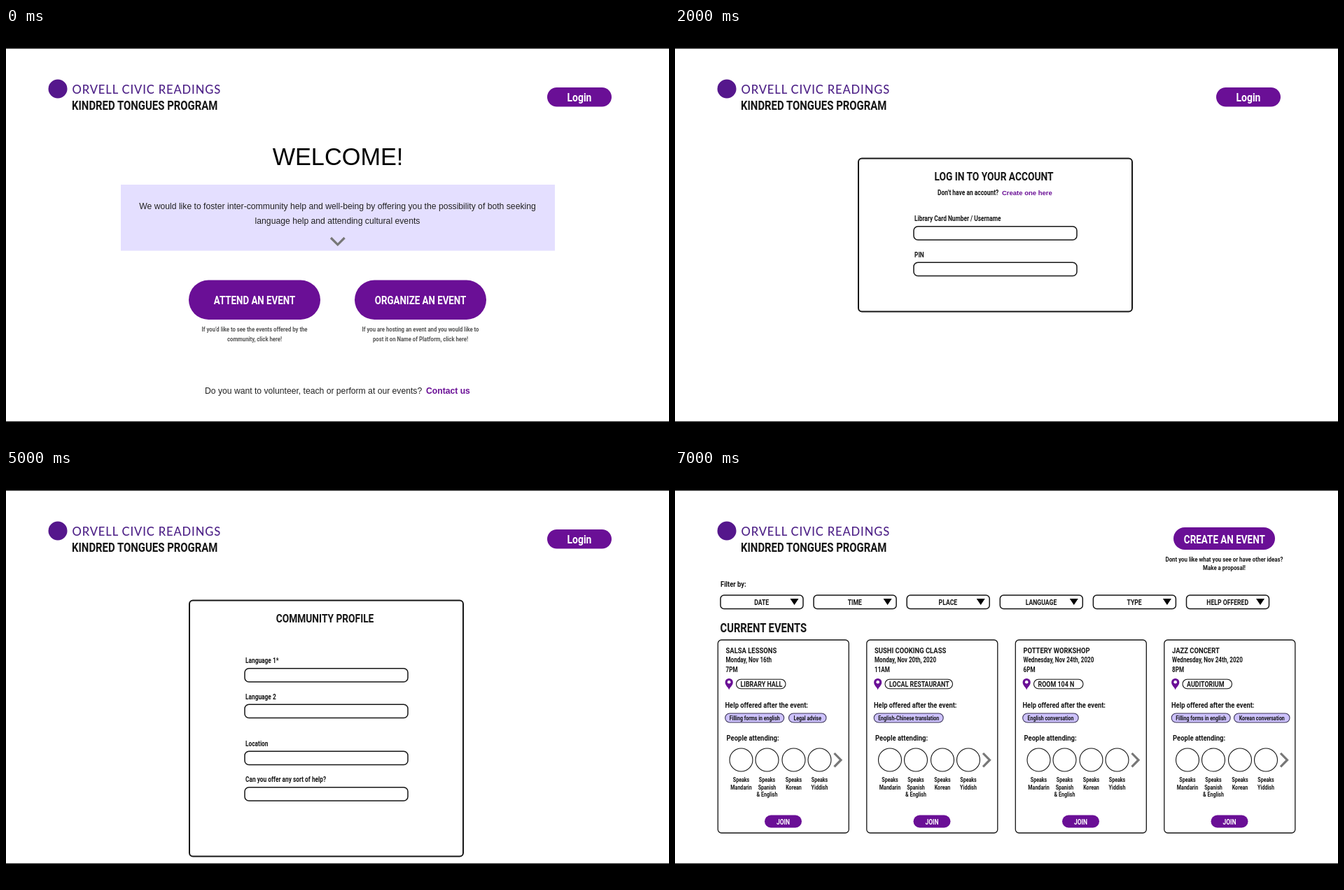
An HTML page that plays this animation: 947x592 px, repeating every 8000 ms.

```html
<!DOCTYPE html>
<html lang="en">
<head>
<meta charset="utf-8">
<title>Community events prototype</title>
<style>
  html, body { margin: 0; width: 100%; height: 100%; overflow: hidden; background: #fff; }
  svg { display: block; }
  text { white-space: pre; }
  .cond { font-family: Roboto, sans-serif; }
  .sans { font-family: "Liberation Sans", sans-serif; }
  .brand { font-family: Lato, sans-serif; font-weight: 500; letter-spacing: .85px; }
</style>
</head>
<body>
<svg id="stage" width="947" height="592" viewBox="0 0 947 592"></svg>
<script>
const INK = '#161616', GRAY = '#777', PURPLE = '#6a0f96', LILAC = '#cdc2fe', PALE = '#e4dfff';
const STEP = 1000;
const NARROW = 0.81, CAP = 0.955; // proportions of the condensed face

const anchors = { l: 'start', c: 'middle' };

function cond(x, y, str, size, fill = INK, align = 'l', weight = 600) {
  return `<text class="cond" transform="translate(${x} ${y}) scale(${NARROW} 1)" font-size="${size * CAP}" ` +
    `fill="${fill}" text-anchor="${anchors[align]}" font-weight="${weight}">${str}</text>`;
}
const mid = (x, y, str, size, fill, weight) => cond(x, y, str, size, fill, 'c', weight);

function sans(x, y, str, size, fill = '#222', align = 'c', weight = 400) {
  return `<text class="sans" x="${x}" y="${y}" font-size="${size}" fill="${fill}" ` +
    `text-anchor="${anchors[align]}" font-weight="${weight}">${str}</text>`;
}

function box(x, y, w, h, r = 6, fill = '#fff', stroke = INK, line = 1.5) {
  return `<rect x="${x}" y="${y}" width="${w}" height="${h}" rx="${r}" fill="${fill}" ` +
    `stroke="${stroke}" stroke-width="${line}"/>`;
}
const panel = (x, y, w, h, line = 2) => box(x, y, w, h, 5, '#fff', INK, line);
const pill = (x, y, w, h) => box(x, y, w, h, h / 2, PURPLE, 'none', 0);
const arrow = (x, y) => `<path d="M${x - 6} ${y}h12l-6 9z" fill="#000"/>`;
const chevron = d => `<path d="${d}" fill="none" stroke="${GRAY}" stroke-width="3.2"/>`;
const lines = (x, y, gap, rows, draw) => rows.map((row, i) => draw(x, y + i * gap, row)).join('');

const masthead = () =>
  `<circle cx="74" cy="87" r="13.5" fill="#55178c"/>` +
  `<text class="brand" x="94.5" y="94" font-size="16.6" fill="#4f2388">ORVELL CIVIC READINGS</text>` +
  cond(94, 117, 'KINDRED TONGUES PROGRAM', 19.3);

const header = () => masthead() + pill(773, 85, 92, 27.5) + mid(819, 105, 'Login', 18, '#fff');

function bigButton(x, y, label) {
  return pill(x, y, 188, 56.5) + mid(x + 94, y + 34.5, label, 17.2, '#fff');
}

function welcome(open) {
  const top = open ? 418.5 : 360.5;
  const caption = (x, rows) => lines(x, 433.7, 14.7, rows, (a, b, s) => mid(a, b, s, 10, '#555'));
  return header() +
    sans(474, 196, 'WELCOME!', 34.3, '#000') +
    box(164, 224, 620, open ? 169 : 94.5, 0, PALE, 'none', 0) +
    sans(473.5, 258.5, 'We would like to foster inter-community help and well-being by offering you the possibility of both seeking', 12.19) +
    sans(473.5, 280, 'language help and attending cultural events', 12.19) +
    (open
      ? lines(473.5, 313.5, 14.7, [
          'You will be able to consult cultural events occurring around your area. You will notice that the description for',
          'each event not only includes practical event details, but also will show  members of the community who have',
          'volunteered their time and expertise to help with a particular language service.',
          'If you see an event  and/or a language service that you like, feel free to register!'
        ], (x, y, s) => sans(x, y, s, 10.76, '#686572')) + chevron('M464 383.5l9.8-9.5l9.8 9.5')
      : chevron('M464 300l9.8 9.8l9.8-9.8') +
        caption(355, ['If you’d like to see the events offered by the', 'community, click here!']) +
        caption(592, ['If you are hosting an event and you would like to', 'post it on Name of Platform, click here!'])) +
    bigButton(261, top, 'ATTEND AN EVENT') +
    bigButton(498, top, 'ORGANIZE AN EVENT') +
    sans(284, 522.5, 'Do you want to volunteer, teach or perform at our events?', 12.17, '#222', 'l') +
    sans(600, 522.5, 'Contact us', 12.17, PURPLE, 'l', 700);
}

const field = (y, label) => cond(342, y, label, 10.8) + box(341, y + 7.7, 233, 19.3);

function account(height, title, fields) {
  return header() + panel(262, 186.5, 391, height) + mid(455.5, 218, title, 17.8) +
    fields.map(f => field(...f)).join('');
}
const prompt = (x, ask, linkX, link) =>
  cond(x, 238.5, ask, 10.9) + sans(linkX, 238.5, link, 9.5, PURPLE, 'l', 700);

const login = () =>
  account(219, 'LOG IN TO YOUR ACCOUNT', [[276, 'Library Card Number / Username'], [327.5, 'PIN']]) +
  prompt(375, 'Don’t have an account?', 467, 'Create one here');

const signup = () =>
  account(332, 'CREATE YOUR ACCOUNT',
    [[276, 'Library Card Number / Username*'], [327.5, 'Phone'], [394.5, 'email'], [446, 'Create a PIN']]) +
  prompt(383, 'Already have an account?', 482, 'Log in here');

const option = (x, y, w, label) =>
  box(x, y, w, 12, 6, '#fff', '#777', 1) + mid(x + w / 2, y + 9.3, label, 10.8, '#666');

const created = () => signup() +
  `<g opacity=".94">${box(374.5, 289, 167, 142, 4, LILAC, '#746b96', 1)}</g>` +
  lines(459, 319, 15, ['Your account has been', 'successfully created!'], (x, y, s) => mid(x, y, s, 15.2)) +
  lines(459.5, 353, 14.7, ['Do you want to complete your', 'community profile?'], (x, y, s) => mid(x, y, s, 11.1)) +
  option(443, 384, 29.5, 'Yes') + option(423, 403, 70, 'remind me later');

const profile = () =>
  account(366, 'COMMUNITY PROFILE', [[276, 'Language 1*'], [327.5, 'Language 2'], [394.5, 'Location'],
    [446, 'Can you offer any sort of help?']]);

const hint = (x, y, label) => cond(x, y, label, 10.8, GRAY);

function select(x, y, w, label = 'Select') {
  return box(x, y, w, 19.5) + hint(x + 7, y + 12.7, label) + arrow(x + w - 11, y + 8);
}

function menu(y, items) {
  return panel(526, y, 148, 173, 1.7) + hint(532.5, y + 12.5, 'Select') + arrow(662.5, y + 7.5) +
    lines(533, y + 31, 27.1, items, (a, b, s) => box(a, b, 124, 19.3) + hint(a + 7, b + 13.7, s));
}

function eventForm() {
  const label = (y, s) => cond(128.5, y, s, 10.8);
  return panel(89, 86.5, 391, 433.5) + mid(282, 114, 'CREATE AN EVENT', 17.4) +
    label(158, 'Event Name*') + box(209, 146, 232.5, 19) +
    label(191.5, 'Date and time*') + select(209, 179.5, 109, 'Select Date') + select(337, 179.5, 104.5, 'Select Time') +
    label(225.5, 'Language 1*') + select(209, 213, 232.5) +
    label(259, 'Language 2') + select(209, 246.5, 232.5) +
    label(296, 'Location') + select(209, 283, 232.5) +
    hint(216, 317.5, 'Do you have your own hosting location? click') +
    cond(386, 317.5, 'here', 10.8, '#3a1fa8', 'l', 700) +
    label(344.5, 'Description') + box(209, 332, 232.5, 56) +
    label(419, 'Does the event offer any sort of help to') + label(431, 'other members of the community?') +
    select(293, 406.5, 148.5) +
    label(453, 'In which language?') + select(293, 440.5, 148.5) +
    box(168, 479, 232.5, 19.3, 5, LILAC) + mid(284.5, 493, 'SUBMIT', 12.2) +
    cond(525.5, 114.5, 'Can you offer any sort of help to other', 10.7) +
    cond(525.5, 126.5, 'members of the community?', 10.7) +
    menu(140, ['Filling forms', 'Legal advise', 'Conversation practice', 'Financial advise', 'Translation']) +
    menu(328.3, ['English-Spanish', 'English-Chinese', 'English-Yiddish', 'English-Bengali', 'English-Greek']) +
    box(738.5, 241, 148.5, 139, 4, LILAC, '#2c2840') +
    lines(808, 279.5, 14.3, ['Thank you!', 'The KTP is reviewing', 'your  application and', 'will contact you once',
      'the request is', 'approved.'], (x, y, s) => mid(x, y, s, 12.1));
}

const speakers = [[33.5, 'Mandarin'], [70.5, 'Spanish', '&amp; English'], [108.5, 'Korean'], [145.5, 'Yiddish']];

function card({ title, date, time, place, placeW, tags }, i) {
  const pin = `<path d="M16.2 314.5c-1-4-5.6-6-5.6-11a5.6 5.6 0 0 1 11.2 0c0 5-4.6 7-5.6 11z" fill="${PURPLE}"/>` +
    `<circle cx="16.2" cy="303.3" r="2.3" fill="#fff"/>`;
  const people = speakers.map(([x, ...words]) =>
    `<circle cx="${x}" cy="414.5" r="16.5" fill="#fff" stroke="${INK}" stroke-width="1.1"/>` +
    lines(x, 446, 10.7, ['Speaks', ...words], (a, b, s) => mid(a, b, s, 9.2))).join('');
  return `<g transform="translate(${61 + i * 212.5} 0)">` +
    box(0.3, 243, 187, 276, 5, '#fff', INK, 1.3) +
    cond(11.5, 262, title, 12.2) + cond(11.5, 275.3, date, 10.5) + cond(11.5, 289.3, time, 10.5) +
    pin + box(26.5, 299.3, placeW, 13.5, 6.7, '#fff', INK, 1.1) + cond(32.5, 310, place, 11.5) +
    cond(10.5, 339.5, 'Help offered after the event:', 12.1) +
    tags.map(([x, w, s]) => box(x, 348, w, 13, 6.5, LILAC, '#3a3357', 1.1) + mid(x + w / 2, 357.5, s, 9.1)).join('') +
    cond(12.5, 387, 'People attending:', 12.3) + people + chevron('M166.5 405l9.5 9.7l-9.5 9.7') +
    pill(67, 493.5, 53, 18) + mid(93.5, 506.7, 'JOIN', 11, '#fff') + '</g>';
}

const cards = [
  { title: 'SALSA LESSONS', date: 'Monday, Nov 16th', time: '7PM', place: 'LIBRARY HALL', placeW: 70.5,
    tags: [[10.7, 84, 'Filling forms in english'], [101.5, 53.5, 'Legal advise']] },
  { title: 'SUSHI COOKING CLASS', date: 'Monday, Nov 20th, 2020', time: '11AM', place: 'LOCAL RESTAURANT', placeW: 96.5,
    tags: [[10.7, 99, 'English-Chinese translation']] },
  { title: 'POTTERY WORKSHOP', date: 'Wednesday, Nov 24th, 2020', time: '6PM', place: 'ROOM 104 N', placeW: 70.5,
    tags: [[10.7, 79.5, 'English conversation']] },
  { title: 'JAZZ CONCERT', date: 'Wednesday, Nov 24th, 2020', time: '8PM', place: 'AUDITORIUM', placeW: 70.5,
    tags: [[10.7, 84, 'Filling forms in english'], [100, 79.5, 'Korean conversation']] }
];

const filters = ['DATE', 'TIME', 'PLACE', 'LANGUAGE', 'TYPE', 'HELP OFFERED'];

const listing = () => masthead() +
  pill(712, 82, 145, 32) + mid(784.8, 104.5, 'CREATE AN EVENT', 17.4, '#fff') +
  mid(784.5, 130.5, 'Dont you like what you see or have other ideas?', 10.2) +
  mid(784.5, 142.5, 'Make a proposal!', 10.2) +
  cond(65, 167, 'Filter by:', 12.1) +
  filters.map((name, i) => {
    const x = 65 + i * 133.1;
    return box(x, 179, 118, 19.5, 5) + mid(x + 58.7, 193, name, 11.2) + arrow(x + 105.5, 184);
  }).join('') +
  cond(64.5, 232, 'CURRENT EVENTS', 19.1) + cards.map(card).join('');

const scenes = [welcome(false), welcome(true), login(), signup(), created(), profile(), eventForm(), listing()];
const stage = document.getElementById('stage');
stage.innerHTML = '<rect width="947" height="592" fill="#fff"/>' +
  scenes.map(s => `<g class="scene" visibility="hidden">${s}</g>`).join('') +
  '<path d="M0 0h947v29.5H0zM0 562.5h947V592H0z"/>';

const groups = [...stage.querySelectorAll('.scene')];
const start = performance.now();
function tick(now) {
  const current = Math.floor(Math.max(0, now - start) / STEP) % groups.length;
  groups.forEach((g, i) => g.setAttribute('visibility', i === current ? 'visible' : 'hidden'));
  requestAnimationFrame(tick);
}
tick(start);
</script>
</body>
</html>
```
